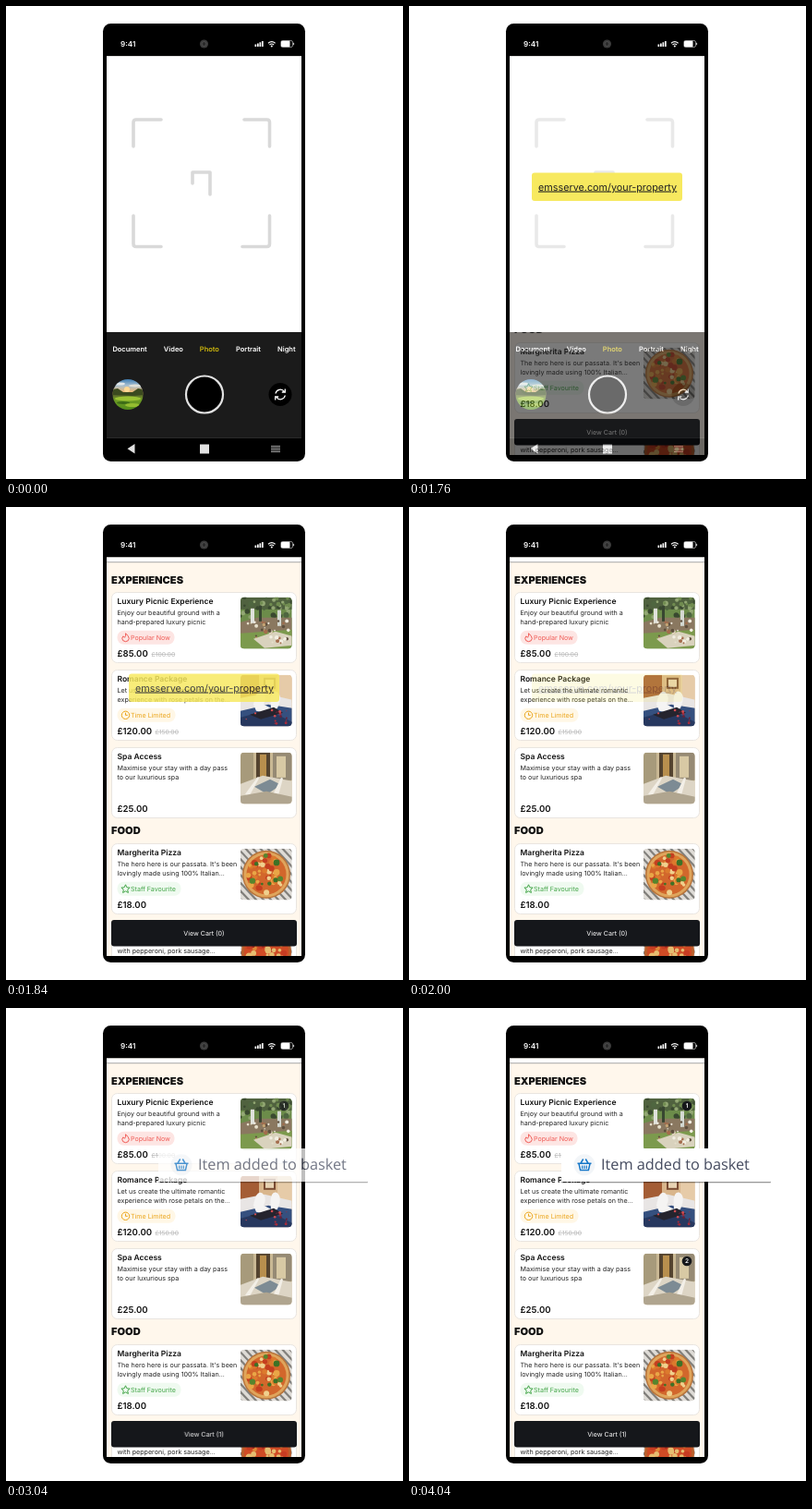
Recreate the animation shown at these times as an HTML page. Size 430 px wide and 512 px high, loop 4120 ms.

```html
<!DOCTYPE html>
<html lang="en">
<head>
<meta charset="utf-8">
<style>
html, body { margin: 0; width: 100%; height: 100%; overflow: hidden; background: #fff; }
svg { display: block; }
text { font-family: Inter, Roboto, sans-serif; fill: #111; text-rendering: geometricPrecision; }
.head { font-size: 11.1px; font-weight: 900; }
.title { font-size: 8.5px; font-weight: 600; }
.body { font-size: 7.15px; fill: #222; }
.price { font-size: 9.6px; font-weight: 600; }
.old { font-size: 6.8px; fill: #b8b8b8; text-decoration: line-through; }
.tag { font-size: 7.1px; }
.mode { font-size: 7.5px; font-weight: 600; fill: #fff; }
.cart { font-size: 7.1px; fill: #fff; text-anchor: middle; }
.num { font-size: 6.5px; font-weight: 600; fill: #fff; text-anchor: middle; }
.url { font-size: 10.8px; fill: #222; text-decoration: underline; text-underline-offset: 1.5px; }
.toast { font-family: "Open Sans", "Noto Sans", sans-serif; font-size: 16.3px; fill: #454b5f; }
</style>
</head>
<body>
<svg width="430" height="512" viewBox="0 0 430 512">
  <defs>
    <clipPath id="screen"><rect x="109" y="54.5" width="211" height="431.5"/></clipPath>
    <clipPath id="photo"><rect width="55.5" height="55.5" rx="4"/></clipPath>
    <clipPath id="thumb"><circle cx="132" cy="420.5" r="16.5"/></clipPath>
    <linearGradient id="sky" x2="0" y2="1">
      <stop offset="0" stop-color="#3f7fb5"/><stop offset=".2" stop-color="#a9c0d0"/>
      <stop offset=".42" stop-color="#f3b76a"/><stop offset=".5" stop-color="#5d6a2c"/>
      <stop offset=".65" stop-color="#6f9c25"/><stop offset="1" stop-color="#4f8a1a"/>
    </linearGradient>
    <filter id="shade" x="-5%" y="-10%" width="110%" height="130%">
      <feDropShadow dx="0" dy="1.3" stdDeviation=".7" flood-opacity=".4"/>
    </filter>
  </defs>

  <rect x="105" y="19" width="219" height="474" rx="8.5"/>
  <g id="menu" clip-path="url(#screen)"></g>

  <rect id="view" x="109" y="54.5" width="211" height="298.5" fill="#fff"/>
  <g id="camera">
    <path d="M168 123H141Q138 123 138 126V152 M258 123H282.5Q285.5 123 285.5 126V152 M138 227V257.5Q138 260.5 141 260.5H168 M285.5 227V257.5Q285.5 260.5 282.5 260.5H256 M202 192V180H221V204"
      fill="none" stroke="#d9d9d9" stroke-width="3.6" stroke-linejoin="round" stroke-linecap="round"/>
    <rect x="109" y="353" width="211" height="115" fill="#1b1b1b"/>
    <path d="M109 467.5H320" stroke="#333" stroke-width=".6"/>
    <rect x="109" y="468" width="211" height="23"/>
    <text class="mode" x="115.4" y="373.5">Document</text>
    <text class="mode" x="170.8" y="373.5">Video</text>
    <text class="mode" x="209.8" y="373.5" style="fill:#cfb80d">Photo</text>
    <text class="mode" x="249" y="373.5">Portrait</text>
    <text class="mode" x="294" y="373.5">Night</text>
    <g clip-path="url(#thumb)">
      <rect x="115" y="404" width="34" height="34" fill="url(#sky)"/>
      <ellipse cx="123" cy="409" rx="6" ry="1.6" fill="#e3e7e8"/>
      <ellipse cx="140" cy="411" rx="7" ry="1.5" fill="#dfe0d8"/>
      <circle cx="131" cy="415" r="3" fill="#ffd994"/>
      <path d="M115 415l6-1 6 4h10l6-4 6 1v6l-12 1-22-1z" fill="#3b4a1f"/>
      <ellipse cx="132" cy="425" rx="14" ry="2.6" fill="#9cc334"/>
      <ellipse cx="127" cy="429.500" rx="7" ry="1.500" fill="#3c6b17"/>
      <ellipse cx="137" cy="432" rx="8" ry="2" fill="#94bd30"/>
    </g>
    <circle cx="215" cy="420.5" r="20" stroke="#e3e3e3" stroke-width="2.2"/>
    <circle cx="297" cy="420.5" r="12.5"/>
    <path d="M292 419.5a5.2 5.2 0 0 1 9.4-2M302.3 421.5a5.2 5.2 0 0 1-9.4 2M302.3 414.5v3.5h-3.5M291.7 426.500v-3.500h3.500"
      fill="none" stroke="#fff" stroke-width="1.3"/>
    <path d="M139.5 474v10.5l-8-5.25zM210 474.5h10v10h-10z" fill="#e2e2e2"/>
    <path d="M287 476.5h10m-10 2h10m-10 2h10m-10 2h10" stroke="#bbb" stroke-width=".9"/>
  </g>

  <text x="124" y="44" style="font-size:8.1px;font-weight:600;fill:#fff">9:41</text>
  <circle cx="214.5" cy="41" r="4.6" fill="#3a3a3a"/>
  <circle cx="214.5" cy="41" r="2.4" fill="#2a2a2a" stroke="#555" stroke-width=".8"/>
  <path d="M269.5 41.5h1.7v2.5h-1.7zM272 40.5h1.7v3.5h-1.7zM274.5 39.3h1.7v4.7h-1.7zM277 38h1.7v6h-1.7z" fill="#fff"/>
  <path d="M284 40.2q3.8-3.2 7.6 0M285.5 42q2.3-2 4.6 0" fill="none" stroke="#fff" stroke-width="1.2"/>
  <circle cx="287.8" cy="43.6" r="1" fill="#fff"/>
  <rect x="297.8" y="37.500" width="12.700" height="7" rx="1.700" fill="none" stroke="#aaa" stroke-width=".8"/>
  <rect x="298" y="37.800" width="9.500" height="6.400" rx="1" fill="#fff"/>
  <path d="M311.600 39.800v2.400" stroke="#ccc" stroke-width="1"/>

  <g id="banner">
    <rect x="133" y="180.5" width="163" height="30.5" rx="3" fill="#f7e95f"/>
    <text class="url" x="140" y="199.5">emsserve.com/your-property</text>
  </g>

  <g id="badge1"><circle cx="301" cy="106" r="5.3" fill="#15171a"/><text class="num" x="301" y="108.4">1</text></g>
  <g id="badge2"><circle cx="301" cy="274" r="5.3" fill="#15171a"/><text class="num" x="301" y="276.4">2</text></g>

  <g id="toast">
    <rect x="165" y="152" width="227" height="36" rx="1" fill="#fff" filter="url(#shade)"/>
    <circle cx="190" cy="169.8" r="11.5" fill="#f2f5f8"/>
    <g fill="none" stroke="#1677c8" stroke-width="1.5" stroke-linejoin="round">
      <path d="M182.5 168.2h15M186 168l2.7-4.5M194 168l-2.7-4.5M184 168.5l1.6 7h8.8l1.6-7"/>
      <path d="M187.7 170.5v3.5m2.3-3.5v3.5m2.3-3.5v3.5" stroke-width="1.2"/>
    </g>
    <text class="toast" x="208" y="175.3">Item added to basket</text>
  </g>
</svg>

<script>
const $ = id => document.getElementById(id);
const rect = (x, y, w, h, fill, more = '') => `<rect x="${x}" y="${y}" width="${w}" height="${h}" fill="${fill}" ${more}/>`;
const dot = (x, y, r, fill) => `<circle cx="${x}" cy="${y}" r="${r}" fill="${fill}"/>`;
const path = (d, fill) => `<path d="${d}" fill="${fill}"/>`;
const text = (cls, x, y, s, more = '') => `<text class="${cls}" x="${x}" y="${y}" ${more}>${s}</text>`;

let seed = 7;
const rnd = () => (seed = seed * 16807 % 2147483647) / 2147483647;
const pick = list => list[Math.floor(rnd() * list.length)];
const specks = (n, x, y, w, h, size, colors) => Array.from({ length: n }, () =>
  dot(x + rnd() * w, y + rnd() * h, size * (.5 + rnd()), pick(colors))).join('');

function toppings(n, colors) {
  return Array.from({ length: n }, () => {
    const a = rnd() * 2 * Math.PI, r = 21 * Math.sqrt(rnd());
    return dot(28 + r * Math.cos(a), 28 + r * Math.sin(a), 1.2 + rnd() * 2.2, pick(colors));
  }).join('');
}

const picnic = rect(0, 0, 56, 56, '#6c8c4a') + rect(0, 0, 56, 13, '#50623f') +
  specks(45, 0, 0, 56, 22, 2, ['#39492f', '#708c50', '#92a773', '#4f6640']) +
  path('M0 27L18 22H56V43L30 47 0 39z', '#8a7860') + path('M0 39L56 35V56H0z', '#7c9a4d') +
  path('M14 45L38 37 56 42V52L26 55z', '#d9d2bd') +
  rect(11, 12, 4, 16, '#e0e2db') + rect(20, 9, 3, 17, '#384631') + rect(40, 14, 4, 17, '#d4d9d2') +
  specks(35, 8, 25, 44, 25, 1.5, ['#e6dfcb', '#c6a574', '#5f503e', '#f2eee2', '#a36c4c']);

const romance = rect(0, 0, 56, 56, '#d9b68c') + rect(0, 0, 20, 26, '#a45d35') + rect(25, 3, 13, 12, '#7a4b32') +
  rect(27, 5, 9, 8, '#e8d3b3') + rect(40, 0, 16, 30, '#e6cba8') + path('M0 25L26 20 56 27V56H0z', '#e8e5e4') +
  path('M0 39L30 32 56 36V56H0z', '#35507f') + path('M0 46L30 38 56 51V56H0z', '#27385f') +
  path('M14 32Q17 14 24 19 29 24 25 32L33 36Q31 16 39 18 46 22 40 36L31 42 17 39z', '#f5f4f3') +
  path('M10 43L36 35 46 41 22 48z', '#25242e') + specks(16, 4, 38, 48, 16, 1, ['#a52b3b', '#d04b50', '#6a2037']);

const spa = rect(0, 0, 56, 56, '#c9b894') + rect(0, 0, 14, 35, '#a79a7b') + rect(17, 0, 15, 27, '#54432f') +
  rect(21, 2, 7, 25, '#b88f4e') + rect(35, 0, 21, 30, '#968a74') + rect(39, 4, 10, 23, '#d8c9a4') +
  path('M0 34L24 25 56 31V56H0z', '#ddd5c5') + path('M15 37L32 29 44 35 29 45z', '#7d8b94') +
  path('M5 45L19 26 20 28 9 48zM34 48L44 27 46 28 40 50z', '#f3efe7') + path('M0 47L28 42 56 48V56H0z', '#b0a58f');

const cloth = rect(0, 0, 56, 56, '#dedbd6') +
  Array.from({ length: 14 }, (_, i) => path(`M${i * 8 - 52} 0l52 56h3l-52-56z`, '#817f7b')).join('');
const pizza = cloth + dot(28, 28, 26, '#b9743a') + dot(28, 28, 24.5, '#dfa55c') + dot(28, 28, 21.5, '#d2672c') +
  toppings(48, ['#e9a646', '#f0d08d', '#c43e20', '#dc7a2d']) + toppings(9, ['#3d7226', '#56852d']);
const spicy = cloth + dot(28, 28, 27, '#b95f2c') + dot(28, 28, 24, '#cf4b25') +
  toppings(55, ['#a92a1c', '#e08b39', '#e5bd70', '#c63c22']);

const icons = {
  flame: 'M0-4.5Q3.5-2 3.8 1 3.5 4.2 0 4.4-3.7 4-3.7 1-3.5-.5-2.5-1.5L-1 0Q.8-2 0-4.5z',
  clock: 'M-4.2 0a4.2 4.2 0 1 1 8.4 0a4.2 4.2 0 1 1-8.4 0M0-2.6V0H2.3',
  star: 'M0-4.5L1.4-1.5 4.6-1.2 2.2 1 2.9 4.2 0 2.5-2.9 4.2-2.2 1-4.6-1.2-1.4-1.5z'
};

function tag(y, icon, label, ink, fill, width) {
  return rect(120.5, y - 7.5, width, 15, fill, 'rx="7"') +
    `<path transform="translate(129.5 ${y})" d="${icons[icon]}" fill="none" stroke="${ink}" stroke-width="1"/>` +
    text('tag', 135, y + 2.5, label, `style="fill:${ink}"`);
}

function card(y, art, title, lines, price, old, label) {
  return rect(114.5, y + .5, 200, 76, '#fff', 'rx="6" stroke="#e9e5e0"') +
    text('title', 120.5, y + 13, title) +
    lines.map((s, i) => text('body', 120.5, y + 25 + i * 10.2, s)).join('') +
    (label ? tag(y + 49.3, ...label) : '') +
    text('price', 120.5, y + 70.4, price) +
    (old ? text('old', old[0], y + 70, old[1]) : '') +
    `<g transform="translate(254 ${y + 5.8})" clip-path="url(#photo)">${art}</g>`;
}

$('menu').innerHTML = rect(109, 54, 211, 432, '#fff7ec') + rect(109, 54, 211, 5, '#fff') +
  rect(109, 59, 211, 1, '#b9b9b9') + rect(109, 60, 211, 1, '#ece6dd') +
  text('head', 114, 82.8, 'EXPERIENCES') + text('head', 114, 354.2, 'FOOD') +
  card(92, picnic, 'Luxury Picnic Experience', ['Enjoy our beautiful ground with a', 'hand-prepared luxury picnic'],
    '£85.00', [157.5, '£100.00'], ['flame', 'Popular Now', '#f05a55', '#fde5e3', 62]) +
  card(176, romance, 'Romance Package', ['Let us create the ultimate romantic', 'experience with rose petals on the...'],
    '£120.00', [161.5, '£150.00'], ['clock', 'Time Limited', '#eba51b', '#fff7e6', 63]) +
  card(260, spa, 'Spa Access', ['Maximise your stay with a day pass', 'to our luxurious spa'], '£25.00') +
  card(364, pizza, 'Margherita Pizza', ["The hero here is our passata. It's been", 'lovingly made using 100% Italian...'],
    '£18.00', null, ['star', 'Staff Favourite', '#43a548', '#effaf0', 69]) +
  card(447.5, spicy, '', ['', 'with pepperoni, pork sausage...'], '') +
  rect(114, 447, 201, 28.5, '#15171b', 'rx="3"') +
  text('cart', 214.5, 464, 'View Cart (0)', 'id="cart0"') + text('cart', 214.5, 464, 'View Cart (1)', 'id="cart1"');

const LOOP = 4120, STEP = 40;
const clamp = v => Math.max(0, Math.min(1, v));
const easeOut = p => 1 - (1 - p) ** 2;
const fade = (id, a) => $(id).setAttribute('opacity', a);

function draw(now) {
  const time = now % LOOP;
  const t = Math.floor(time / STEP) * STEP;
  const camera = t < 1760 ? 1 : .58 * clamp((1840 - t) / 80) ** 1.5;
  const added = easeOut(clamp((t - 2880) / 320));
  fade('camera', camera);
  fade('view', t < 1800 ? 1 : camera);
  fade('banner', t < 880 ? 0 : 1 - clamp((t - 1800) / 240));
  for (const id of ['toast', 'badge1', 'cart1']) fade(id, added);
  fade('cart0', 1 - added);
  fade('badge2', t >= 4040 ? 1 : 0);
}

const start = performance.now();
function tick() {
  draw(performance.now() - start);
  requestAnimationFrame(tick);
}
tick();
</script>
</body>
</html>
```
